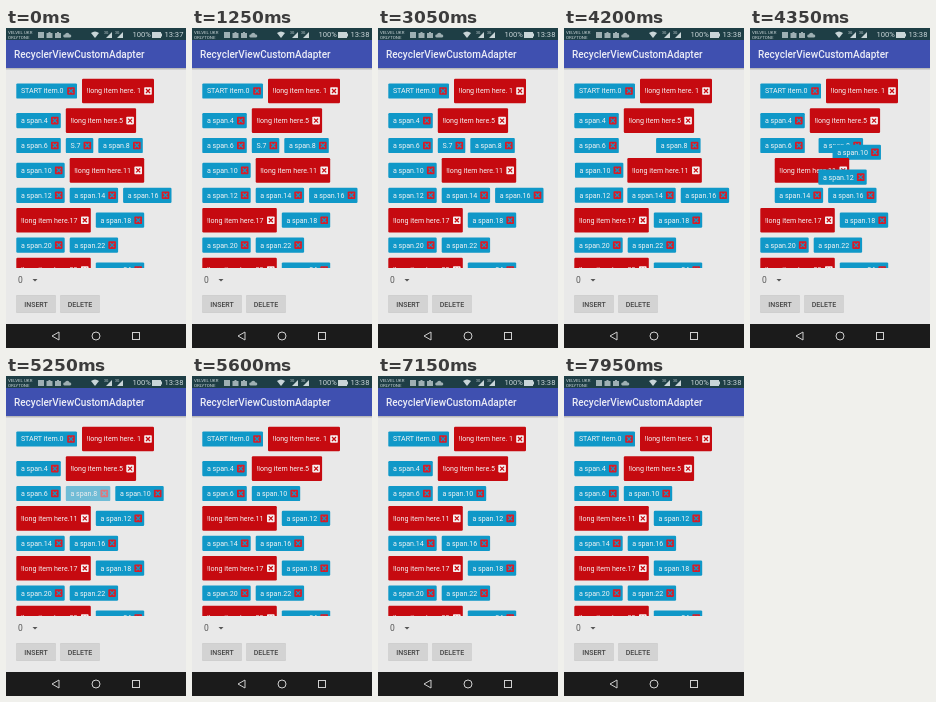
Write an HTML page that moves like this. It is 180x320 px and loops after 8 s.

```html
<!DOCTYPE html>
<html lang="en">
<head>
<meta charset="utf-8">
<title>RecyclerViewCustomAdapter</title>
<style>
  html, body { margin: 0; width: 100%; height: 100%; overflow: hidden; background: #e9e9e9; }
  svg { display: block; width: 100%; height: 100%; font-family: Roboto, sans-serif; }
  .item text { font-size: 7.1px; fill: #f4f4f4; }
  .button rect { fill: #d3d3d3; filter: drop-shadow(0 .6px .5px #0004); }
  .button text { font-size: 7px; font-weight: 500; fill: #444; text-anchor: middle; }
  .status { fill: #c9d5d8; }
  .line { fill: none; stroke: #d0d0d0; }
</style>
</head>
<body>
<svg viewBox="0 0 180 320">
  <defs>
    <clipPath id="list"><rect y="40" width="180" height="200"/></clipPath>
    <linearGradient id="shade" x2="0" y2="1">
      <stop stop-color="#000" stop-opacity=".25"/><stop offset="1" stop-color="#000" stop-opacity="0"/>
    </linearGradient>
  </defs>
  <rect width="180" height="320" fill="#e9e9e9"/>
  <g id="items" clip-path="url(#list)"></g>

  <rect y="40" width="180" height="2.5" fill="url(#shade)"/>
  <rect y="12" width="180" height="28" fill="#3f50b0"/>
  <text x="8" y="29.8" font-size="10" font-weight="500" fill="#ecedf6">RecyclerViewCustomAdapter</text>

  <rect width="180" height="12" fill="#1e3e45"/>
  <g class="status">
    <text x="2" y="5.5" font-size="4.4">VELVEL UKR</text>
    <text x="2" y="10.5" font-size="4.4">ORLYTONE</text>
    <g opacity=".75">
      <path d="M32 4h6v6h-6z"/>
      <path d="M40.500 5h2V4h2v1h2v5h-6z"/>
      <path d="M49 5h2V4h2v1h2v5h-6z"/>
      <path d="M58.500 9.500a1.500 1.500 0 0 1 .5-3a2.300 2.300 0 0 1 4.500 0a1.500 1.500 0 0 1 .5 3z"/>
    </g>
    <path d="M85 5q4-3.2 8 0l-4 5z"/>
    <text x="98" y="6" font-size="3.5">3G</text>
    <path d="M100 10l6-6v6z"/>
    <text x="109" y="6" font-size="3.5">3G</text>
    <path d="M111 10l6-6v6z"/>
    <text x="126.500" y="9.300" font-size="7.600">100%</text>
    <path d="M146 4h9v1.500h1v3h-1V10h-9z"/>
    <text id="clock" x="158.500" y="9.300" font-size="7.600"></text>
  </g>

  <text x="12" y="255.300" font-size="8.500" fill="#555">0</text>
  <path d="M26.500 251h5l-2.500 2.500z" fill="#555"/>
  <g class="button">
    <rect x="10" y="267.500" width="40" height="17" rx="1"/><text x="30" y="278.500">INSERT</text>
    <rect x="54" y="267.500" width="40" height="17" rx="1"/><text x="74" y="278.500">DELETE</text>
  </g>

  <rect y="296" width="180" height="24" fill="#1b1b1b"/>
  <path class="line" d="M53 304v8l-7-4z" stroke-linejoin="round"/>
  <circle class="line" cx="90" cy="308" r="4"/>
  <rect class="line" x="126.500" y="304.500" width="7" height="7"/>
</svg>
<script>
const LOOP = 8000, LEFT_EDGE = 10.3, RIGHT_EDGE = 176, GAP = 5;
const FADE = 120, MOVE = 250;
const BLUE = '#1098c8', RED = '#c60a10';
const removals = [
  { label: 'S.7', fade: 4070, move: 4188 },
  { label: 'a span.8', fade: 5195, move: 5338 },
];

const short = (label, width) => ({ label, width, height: 15.2 });
const span = n => short(`a span.${n}`, n > 9 ? 48.4 : 44.5);
const long = (n, width = 74.5) => ({ label: `!long item here.${n}`, width, height: 24.6, red: true });
const items = [
  short('START item.0', 60.7), long(' 1', 72),
  span(4), long(5, 70.3), span(6), short('S.7', 27.5), span(8),
  span(10), long(11), span(12), span(14), span(16), long(17), span(18),
  span(20), span(22), long(23), span(24),
];

// Left-to-right wrapping rows, each child centred vertically in its row
function flow(list) {
  const places = new Map();
  let x = LEFT_EDGE, y = 50.7, row = [];
  const endRow = () => {
    const height = Math.max(...row.map(item => item.height));
    for (const item of row) places.get(item).y = y + (height - item.height) / 2;
    y += height + GAP;
    x = LEFT_EDGE;
    row = [];
  };
  for (const item of list) {
    if (x + item.width > RIGHT_EDGE) endRow();
    places.set(item, { x, y });
    row.push(item);
    x += item.width + GAP;
  }
  endRow();
  return places;
}

const layouts = [flow(items)];
let remaining = items;
for (const removal of removals) {
  remaining = remaining.filter(item => item.label !== removal.label);
  layouts.push(flow(remaining));
}

document.getElementById('items').innerHTML = items.map(({ label, width, height, red }) => {
  const fill = red ? RED : BLUE, middle = height / 2;
  return `<g class="item">
    <rect width="${width}" height="${height}" rx="1.2" fill="${fill}"/>
    <text x="4.6" y="${middle + 2.4}">${label}</text>
    <g transform="translate(${width - 6} ${middle})">
      <rect x="-3.8" y="-3.8" width="7.6" height="7.6" rx=".8" fill="${red ? '#f6f0f0' : '#d81c28'}"/>
      <path d="M-2-2L2 2M2-2L-2 2" stroke="${fill}" stroke-width="1.3"/>
    </g></g>`;
}).join('');
const nodes = [...document.querySelectorAll('.item')];
const clock = document.getElementById('clock');

function ease(time, start, duration) {
  const p = Math.min(1, Math.max(0, (time - start) / duration));
  return (1 - Math.cos(Math.PI * p)) / 2;
}

function draw(now) {
  const time = now % LOOP;
  clock.textContent = time < 200 ? '13:37' : '13:38';
  items.forEach((item, i) => {
    let { x, y } = layouts[0].get(item), opacity = 1;
    removals.forEach(({ label, fade, move }, step) => {
      if (label === item.label) opacity = 1 - ease(time, fade, FADE);
      const next = layouts[step + 1].get(item);
      if (!next) return;
      const p = ease(time, move, MOVE);
      x += (next.x - x) * p;
      y += (next.y - y) * p;
    });
    nodes[i].setAttribute('transform', `translate(${x} ${y})`);
    nodes[i].setAttribute('opacity', opacity);
  });
  requestAnimationFrame(draw);
}
requestAnimationFrame(draw);
</script>
</body>
</html>
```
